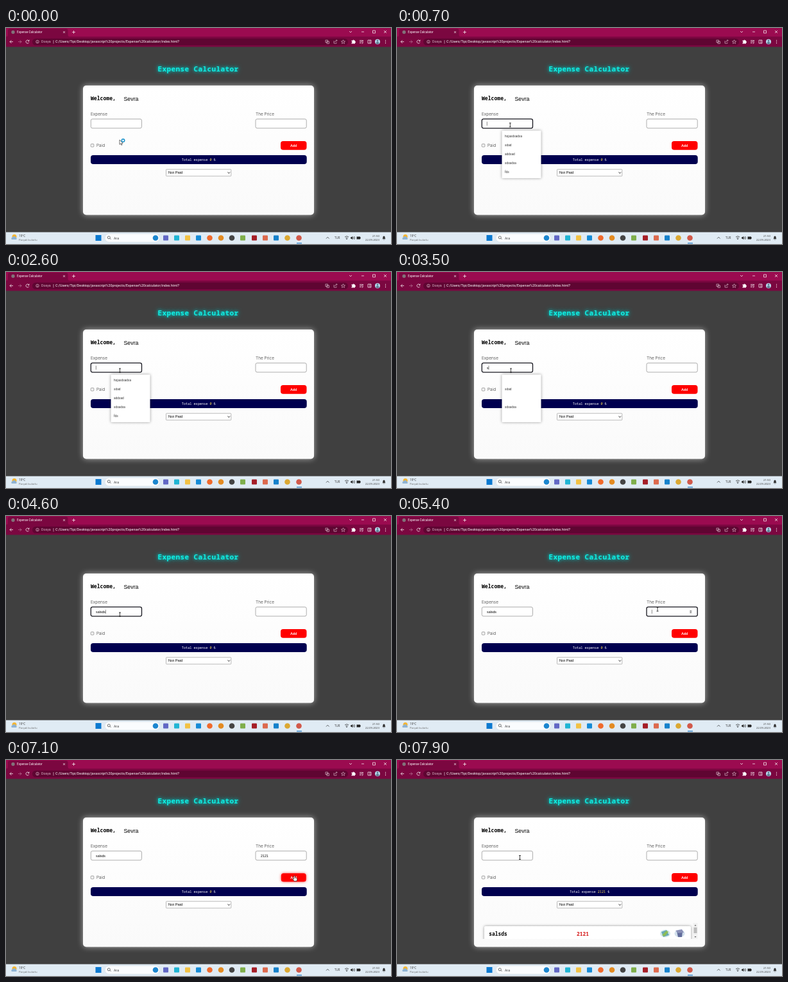
Recreate the animation shown at these times as an HTML page. Size 600 px wide and 338 px high, loop 8000 ms.

```html
<!DOCTYPE html>
<html lang="en">
<head>
<meta charset="utf-8">
<title>Expense Calculator</title>
<style>
  html, body { margin: 0; width: 100%; height: 100%; overflow: hidden; background: #404040; }
  svg { display: block; width: 100%; height: 100%; }
  text { font-family: Roboto, sans-serif; white-space: pre; }
  .mono { font-family: "Noto Sans Mono", monospace; font-weight: 700; }
  .arial { font-family: "Liberation Sans", Arial, sans-serif; }
  .label { font: 300 6.5px Inter, sans-serif; fill: #333; }
  .system { font: 4.7px "Open Sans", sans-serif; fill: #333; }
  .line { fill: none; stroke: #fff; stroke-width: .7; }
  .title { font-size: 11px; letter-spacing: .4px; fill: #0ff0e4; text-shadow: 0 0 4px #00d5d5, 0 0 8px #00a0a0; }
  .card { filter: drop-shadow(0 0 5px #ffffff90); }
  .soft { filter: drop-shadow(0 0 2px #0006); }
  .pressed { filter: drop-shadow(0 0 2px #f0000099); }
</style>
</head>
<body>
<svg viewBox="0 0 600 338">
  <defs>
    <linearGradient id="paper" x2="0" y2="1"><stop stop-color="#fff"/><stop offset="1" stop-color="#fafafa"/></linearGradient>
    <clipPath id="listClip"><rect x="130" y="254" width="340" height="26"/></clipPath>
  </defs>
  <rect width="600" height="338" fill="#404040"/>

  <g id="browser">
    <rect width="600" height="14" fill="#9b0b50"/>
    <path d="M1 13.5Q3 13.5 3 10V4Q3 1 6 1H93Q96.500 1 96.500 4V10Q96.500 13.500 99 13.500H600V29.500H0V13.500Z" fill="#7b0740"/>
    <circle cx="11" cy="6.500" r="2.700" fill="#82727a"/>
    <text x="17" y="8.300" font-size="4.650" fill="#fff">Expense Calculator</text>
    <path class="line" d="M89 5L92 8M92 5L89 8M105.500 4V9M103 6.500H108M535 5L537 7L539 5M554 6H558M571.500 4H575.500V8H571.500ZM589 4L593 8M593 4L589 8"/>
    <rect x="41" y="16.500" width="492" height="10.500" rx="5.250" fill="#5f0532"/>
    <path class="line" d="M11 21.500H6M8.500 19L6 21.500L8.500 24M35.500 20A2.500 2.500 0 1 0 35.800 22.500M36 18.500V20.500H34"/>
    <path class="line" opacity=".45" d="M19 21.500H24M21.500 19L24 21.500L21.500 24"/>
    <g class="line" style="stroke:#d8b8c8">
      <circle cx="49" cy="21.500" r="2.300"/><path d="M49 21V23M49 19.700V20.300M74 19V24.500"/>
      <rect x="498" y="19" width="3.500" height="3.500"/><rect x="500" y="21" width="3.500" height="3.500"/>
      <path d="M511 20V24H515V22.500M512.500 22Q513 19.500 516 19.500M514.500 18L516 19.500L514.500 21"/>
      <path d="M525.500 18.700L526.400 20.700L528.500 20.900L526.900 22.300L527.400 24.400L525.500 23.200L523.600 24.400L524.100 22.300L522.500 20.900L524.600 20.700Z"/>
    </g>
    <text x="55" y="23.400" font-size="5.350" fill="#d8b8c8">Dosya</text>
    <text x="77" y="23.400" font-size="5.350" fill="#fff">C:/Users/Tipi/Desktop/javascript%20projects/Expense%20calculator/index.html?</text>
    <path d="M538.500 19.500H540.500A1 1 0 0 1 542.500 19.500H544V21A1 1 0 0 1 544 23V24.500H538.500V23A1 1 0 0 0 538.500 21Z" fill="#fff"/>
    <path class="line" d="M551 19.500H557M551 21.500H555M551 23.500H553.500M556 20V24H554.500M564 19H569V24H564ZM567 19V24"/>
    <circle cx="579" cy="21.500" r="4" fill="#b9dcef"/>
    <path d="M576 23.700Q579 20 582 23.700Q579 26.500 576 23.700" fill="#58798e"/><circle cx="579" cy="20" r="1.500" fill="#58798e"/>
    <g fill="#fff"><circle cx="591.500" cy="19.300" r=".6"/><circle cx="591.500" cy="21.500" r=".6"/><circle cx="591.500" cy="23.700" r=".6"/></g>
  </g>

  <text class="mono title" x="236.500" y="67.500">Expense Calculator</text>
  <rect class="card" x="120" y="90" width="360" height="202.500" rx="5" fill="url(#paper)"/>
  <text class="mono" x="132" y="113.300" font-size="8.100">Welcome,</text>
  <text class="arial" x="183.500" y="113.600" font-size="8.800">Sevra</text>
  <text class="label" x="132" y="137.200">Expense</text>
  <text class="label" x="389" y="137.200">The Price</text>
  <text class="label" x="141" y="186">Paid</text>
  <rect x="132.300" y="181.500" width="4.500" height="4.500" rx=".8" fill="#fff" stroke="#666" stroke-width=".6"/>

  <rect id="expenseBox" x="132.300" y="142.400" width="79.200" height="14.400" rx="2.500"/>
  <rect id="priceBox" x="389" y="142.400" width="79.200" height="14.400" rx="2.500"/>
  <text id="expenseText" class="arial" x="140" y="151.500" font-size="5.300"/>
  <text id="priceText" class="arial" x="397" y="151.500" font-size="5.300"/>
  <path id="caret" stroke="#111" stroke-width=".5"/>
  <g id="spinner"><rect x="455.500" y="147" width="4.500" height="5.600" fill="#e8e8e8"/><path d="M456.500 149.300L457.750 147.700L459 149.300ZM456.500 150.400L457.750 152L459 150.400Z" fill="#444"/></g>

  <g id="button">
    <rect x="428" y="177" width="40.500" height="13.800" rx="4" fill="#f00"/>
    <text class="arial" x="448.200" y="185.700" font-size="5.300" font-weight="700" fill="#fff" text-anchor="middle">Add</text>
  </g>
  <rect x="132" y="199" width="336.700" height="14" rx="4" fill="#00004f"/>
  <text class="mono" x="300.300" y="208" font-size="5.200" style="font-weight:500" fill="#fff" text-anchor="middle">Total expense <tspan id="total" fill="#ffe24a">0</tspan> ₺</text>
  <rect x="249.500" y="221.200" width="101.300" height="10.600" rx="1" fill="#fff" stroke="#777" stroke-width=".5"/>
  <text class="arial" x="253" y="228.400" font-size="5.800">Not Paid</text>
  <path d="M345.500 225.500L347.300 227.500L349.100 225.500" fill="none" stroke="#222" stroke-width=".9"/>

  <g id="list" clip-path="url(#listClip)">
    <rect class="soft" x="136" y="260" width="322" height="30" rx="2" fill="#fff"/>
    <text class="mono" x="143.300" y="274.600" font-size="7.900">salsds</text>
    <text class="mono" x="280" y="274.600" font-size="7.900" fill="#d41414">2121</text>
    <ellipse cx="418" cy="271.500" rx="8" ry="6" fill="#d5e9ec"/>
    <path d="M412 269L420 266L424 274L415 277Z" fill="#68a8b4"/><path d="M413 274L420 267L423 269L417 276Z" fill="#8dbd55"/>
    <ellipse cx="440.500" cy="271.500" rx="8" ry="6" fill="#d2e0ec"/>
    <path d="M436 268H445L444 277H438Z" fill="#626c9b"/><path d="M434 267L444 265L447 270L438 271Z" fill="#8b91b7"/>
    <rect x="461.500" y="255" width="7" height="25" fill="#f1f1f1"/><rect x="462.500" y="262" width="5" height="9" fill="#bcbcbc"/>
    <path d="M463.500 259.500L465 257.800L466.500 259.500ZM463.500 276L465 277.700L466.500 276Z" fill="#555"/>
  </g>

  <g id="dropdown">
    <rect class="soft" x="163.500" y="160.500" width="61" height="74.500" rx="1" fill="#fff"/>
    <rect id="hover" x="163.500" width="61" height="14" fill="#dfdfdf"/>
    <g id="options"></g>
  </g>

  <g id="taskbar">
    <rect y="319.500" width="600" height="18.500" fill="#e0ebf4"/>
    <circle cx="13" cy="326.500" r="3.500" fill="#f4b532"/>
    <path d="M9 331A2 2 0 0 1 10 327.500A3 3 0 0 1 15.500 328A1.700 1.700 0 0 1 16 331Z" fill="#8fb3d4"/>
    <text class="system" x="20" y="326.900">19°C</text>
    <text class="system" x="20" y="333.400" style="font-size:4.300px;fill:#666">Parçalı bulutlu</text>
    <rect x="139.500" y="324" width="9" height="9" fill="#0c79d0"/>
    <rect x="154" y="322" width="85.500" height="13" rx="6.500" fill="#fafcfe" stroke="#cbd5de" stroke-width=".4"/>
    <path d="M163.500 330.800L161.800 329.100M162.300 327.800A2 2 0 1 1 158.300 327.800A2 2 0 1 1 162.300 327.800" fill="none" stroke="#333" stroke-width=".7"/>
    <text class="system" x="168" y="330.700" style="font-size:5.200px">Ara</text>
    <g id="icons"></g>
    <path d="M453 336.700H461" stroke="#0b6fc4" stroke-width="1"/>
    <path d="M499 329.500L501.300 327.200L503.600 329.500M528 327Q531 324.500 534 327M529.400 328.800Q531 327.500 532.600 328.800M541.200 327Q542.300 328.500 541.200 330M542.600 326Q544.500 328.500 542.600 331" fill="none" stroke="#222" stroke-width=".7"/>
    <circle cx="531" cy="330.300" r=".7"/>
    <path d="M537 327.500H538.300L540.200 325.800V331.200L538.300 329.500H537ZM546.500 326.500H552V330.500H546.500ZM552.200 327.700H553V329.300H552.200Z" fill="#222"/>
    <text class="system" x="512" y="330.300" style="font-size:4.400px">TUR</text>
    <g text-anchor="end"><text class="system" x="582" y="326.900" style="font-size:4.300px">21:50</text><text class="system" x="582" y="333.400" style="font-size:4.300px">22.09.2023</text></g>
    <path d="M586.500 330.300L587.300 329V327.500Q587.500 325.500 589 325.500T590.700 327.500V329L591.500 330.300ZM588.200 331H589.800L589 331.800Z" fill="#333"/>
  </g>

  <g id="pointer">
    <g id="arrow">
      <path d="M0 0V7.300L1.700 5.800L2.900 8.300L4.100 7.700L2.900 5.300H5.200Z" fill="#fff" stroke="#111" stroke-width=".6"/>
      <circle id="busy" cx="5.500" cy="1" r="2.300" fill="#e4f6ff" stroke="#168fc9" stroke-width="1.400"/>
    </g>
    <path id="beam" d="M-1.500 -3H1.500M0 -3V3M-1.500 3H1.500" fill="none" stroke="#111" stroke-width=".8"/>
    <path id="hand" d="M-1 -3.500Q0 -4.300 .6 -3.500L1 -.8L3.800 0Q4.500 .3 4.300 1.500L3.500 4.500H-.5L-2.700 1.300Q-2.600 .3 -1.500 .8L-.7 1.500Z" fill="#fff" stroke="#111" stroke-width=".6"/>
  </g>
</svg>
<script>
const LOOP = 8000, STEP = 100;
const $ = id => document.getElementById(id);
const show = (id, on) => $(id).style.display = on ? "" : "none";
const options = ["hojasdsadsa", "sdad", "addsad", "sdsadsa", "fds"];
const optionTop = i => 162.500 + i * 14.050;

$("options").innerHTML = options.map((word, i) =>
  `<text x="168" y="${optionTop(i) + 8.700}" font-size="4.770" fill="#333">${word}</text>`).join("");

// Taskbar shortcuts: x, colour, shape.
const shortcuts = [
  [233, "#1c86cf", "o"], [249, "#6268c4"], [266, "#20b5d4"], [283, "#f2c244"], [300, "#168bd6"],
  [317.500, "#f06a2c", "o"], [335, "#e38b22", "o"], [352, "#444", "o"], [369, "#7fae4b"],
  [387, "#a51e27"], [404, "#dc6a4e"], [421, "#1681cb"], [438.500, "#dba832", "o"], [456.500, "#d2594a", "o"]
];
$("icons").innerHTML = shortcuts.map(([x, color, shape]) => shape
  ? `<circle cx="${x}" cy="328.500" r="4.300" fill="${color}"/>`
  : `<rect x="${x - 4}" y="324.500" width="8" height="8" rx="1" fill="${color}"/>`).join("");

// Pointer path: time, x, y.
const path = [
  [0, 177, 175], [200, 177, 173], [500, 176, 151], [1000, 177, 153], [1400, 183, 202], [1700, 183, 202],
  [2300, 177.500, 154], [4700, 177.500, 154], [5000, 295, 140], [5200, 406, 146], [6300, 406, 146],
  [6700, 449.500, 185], [7300, 449.500, 185], [7900, 191.500, 152.500]
];
function pointerAt(t) {
  const next = path.findIndex(p => p[0] >= t);
  if (next < 1) return path[0].slice(1);
  const [t0, x0, y0] = path[next - 1], [t1, x1, y1] = path[next];
  const k = (t - t0) / (t1 - t0), ease = k * k * (3 - 2 * k);
  return [x0 + (x1 - x0) * ease, y0 + (y1 - y0) * ease];
}

const expenseKeys = [3500, 3600, 3700, 3800, 4200, 4400], priceKeys = [5900, 6100, 6200, 6400];
const typed = (word, keys, t) => word.slice(0, keys.filter(k => k <= t).length);
const within = (t, from, to) => t >= from && t < to;

function drawBox(id, focused, preview) {
  const box = $(id);
  box.setAttribute("fill", preview ? "#e8f0fe" : "#fff");
  box.setAttribute("stroke", focused ? "#17171f" : "#777");
  box.setAttribute("stroke-width", focused ? 1.300 : .6);
}

function draw(t) {
  const [x, y] = pointerAt(t);
  const added = t >= 7400, open = within(t, 700, 3600);
  const onExpense = within(t, 600, 5200), onPrice = within(t, 5300, 6900);
  const row = Math.floor((y - optionTop(0)) / 14.050);
  const hovered = open && within(t, 1000, 2400) && row >= 0 ? options[row] : "";

  show("dropdown", open);
  show("hover", hovered);
  $("hover").setAttribute("y", optionTop(row));
  $("options").querySelectorAll("text").forEach((el, i) =>
    el.style.display = t >= 3500 && options[i][0] !== "s" ? "none" : "");

  drawBox("expenseBox", onExpense, hovered);
  drawBox("priceBox", onPrice);
  $("expenseText").textContent = added ? "" : hovered || typed("salsds", expenseKeys, t);
  $("priceText").textContent = added ? "" : typed("2121", priceKeys, t);
  show("spinner", onPrice);

  const lastInput = [600, ...expenseKeys, 5300, ...priceKeys].filter(k => k <= t).pop();
  const field = $(onPrice ? "priceText" : "expenseText");
  const caretX = (onPrice ? 397 : 140) + field.getComputedTextLength() + .3;
  show("caret", (onExpense || onPrice) && !hovered && (t - lastInput) % 1000 < 500);
  $("caret").setAttribute("d", `M${caretX} 146.700V152.800`);

  const overButton = x > 428 && y > 177 && y < 191;
  const overField = y > 142 && y < 157 && (x > 132 && x < 212 || x > 389 && x < 468);
  $("button").setAttribute("class", overButton ? "pressed" : "");
  $("button").setAttribute("transform", overButton ? "translate(448.200 184) scale(.96) translate(-448.200 -184)" : "");
  $("total").textContent = added ? "2121" : "0";
  show("list", added);

  $("pointer").setAttribute("transform", `translate(${x} ${y})`);
  show("hand", overButton);
  show("beam", overField);
  show("arrow", !overButton && !overField);
  show("busy", t < 400);
}

function frame() {
  draw(Math.floor(performance.now() % LOOP / STEP) * STEP);
  requestAnimationFrame(frame);
}
frame();
</script>
</body>
</html>
```
